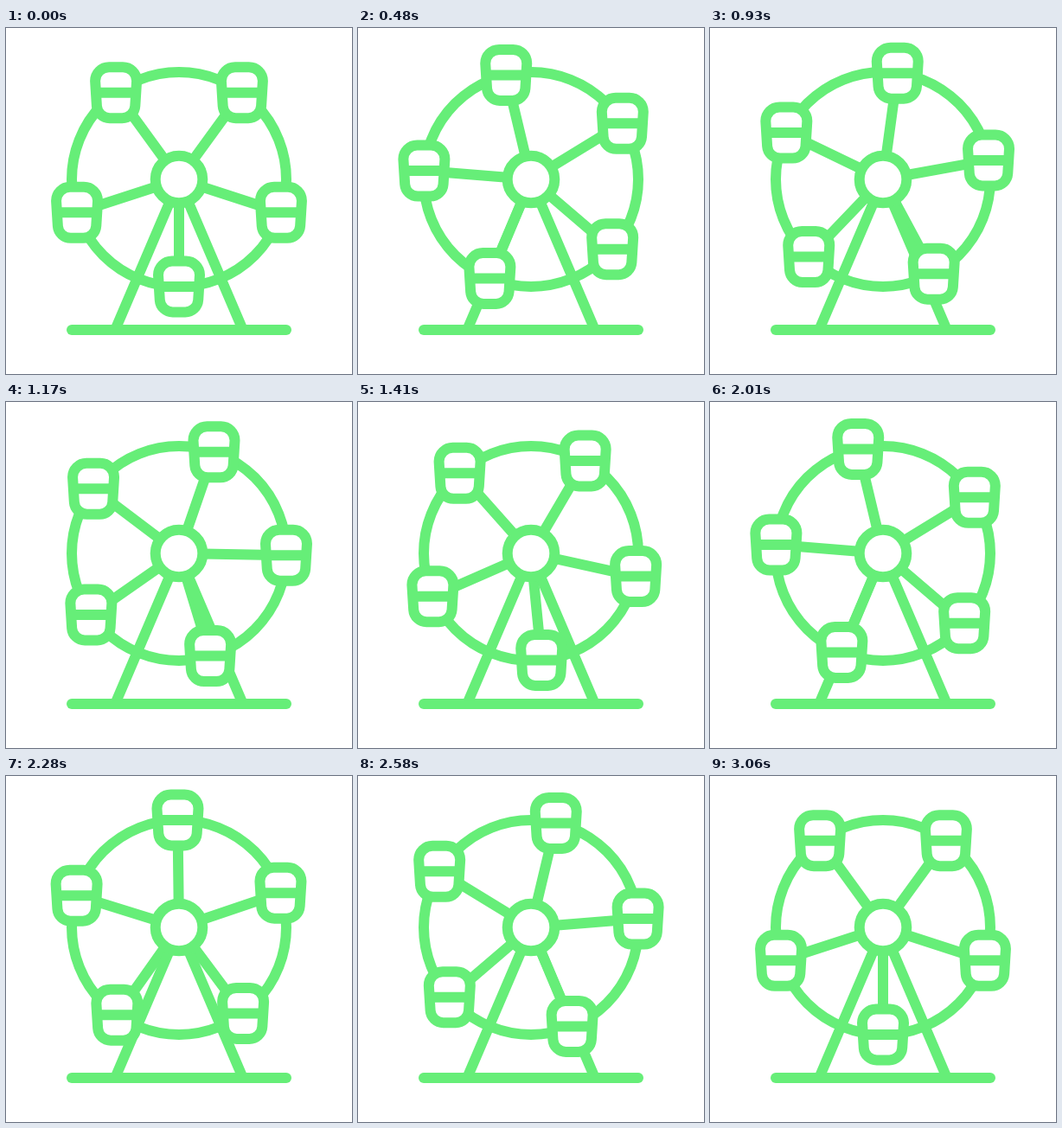
An HTML page that plays this animation: 400 px wide and 400 px high, repeating every 3.09 s.

```html
<!DOCTYPE html>
<html lang="en">
<head>
<meta charset="utf-8">
<title>Ferris wheel</title>
<style>
  html, body { margin: 0; width: 100%; height: 100%; overflow: hidden; background: #fff; }
  svg { display: block; width: 100vw; height: 100vh; }
</style>
</head>
<body>
<svg viewBox="0 0 400 400" fill="none" stroke="#66ee78" stroke-width="12">
  <defs>
    <path id="cabin" fill="#fff" d="M-24-13.5a16 16 0 0 1 16-16h16a16 16 0 0 1 16 16l-1.8 29a15 15 0 0 1-15 14h-14.4a15 15 0 0 1-15-14zM-23 0h46"/>
  </defs>
  <circle cx="200" cy="175" r="124"/>
  <path id="spokes"/>
  <path d="M188.5 203L127 347M211.5 203L273 347"/>
  <path d="M76 349H324" stroke-linecap="round"/>
  <g id="cabins"></g>
  <circle cx="200" cy="175" r="27.3" fill="#fff"/>
</svg>
<script>
  const STEP = 30, STEPS = 103, COUNT = 5, TURN = 144;
  const CX = 200, CY = 175, RADIUS = 124;
  const spokes = document.getElementById('spokes');
  const group = document.getElementById('cabins');

  const cabins = Array.from({ length: COUNT }, () => {
    const use = document.createElementNS('http://www.w3.org/2000/svg', 'use');
    use.setAttribute('href', '#cabin');
    return group.appendChild(use);
  });

  function draw(time) {
    // The wheel advances two cabin places per loop; cabins stay upright.
    const step = Math.floor(time / STEP) % STEPS;
    const turn = TURN * step / (STEPS - 1);
    let d = '';
    cabins.forEach((cabin, i) => {
      const angle = (90 + turn + i * 360 / COUNT) * Math.PI / 180;
      const x = CX + RADIUS * Math.cos(angle);
      const y = CY + RADIUS * Math.sin(angle);
      cabin.setAttribute('transform', `translate(${x} ${y})`);
      d += `M${CX} ${CY}L${x} ${y}`;
    });
    spokes.setAttribute('d', d);
  }

  const start = performance.now();
  function tick() {
    draw(performance.now() - start);
    requestAnimationFrame(tick);
  }
  tick();
</script>
</body>
</html>
```
